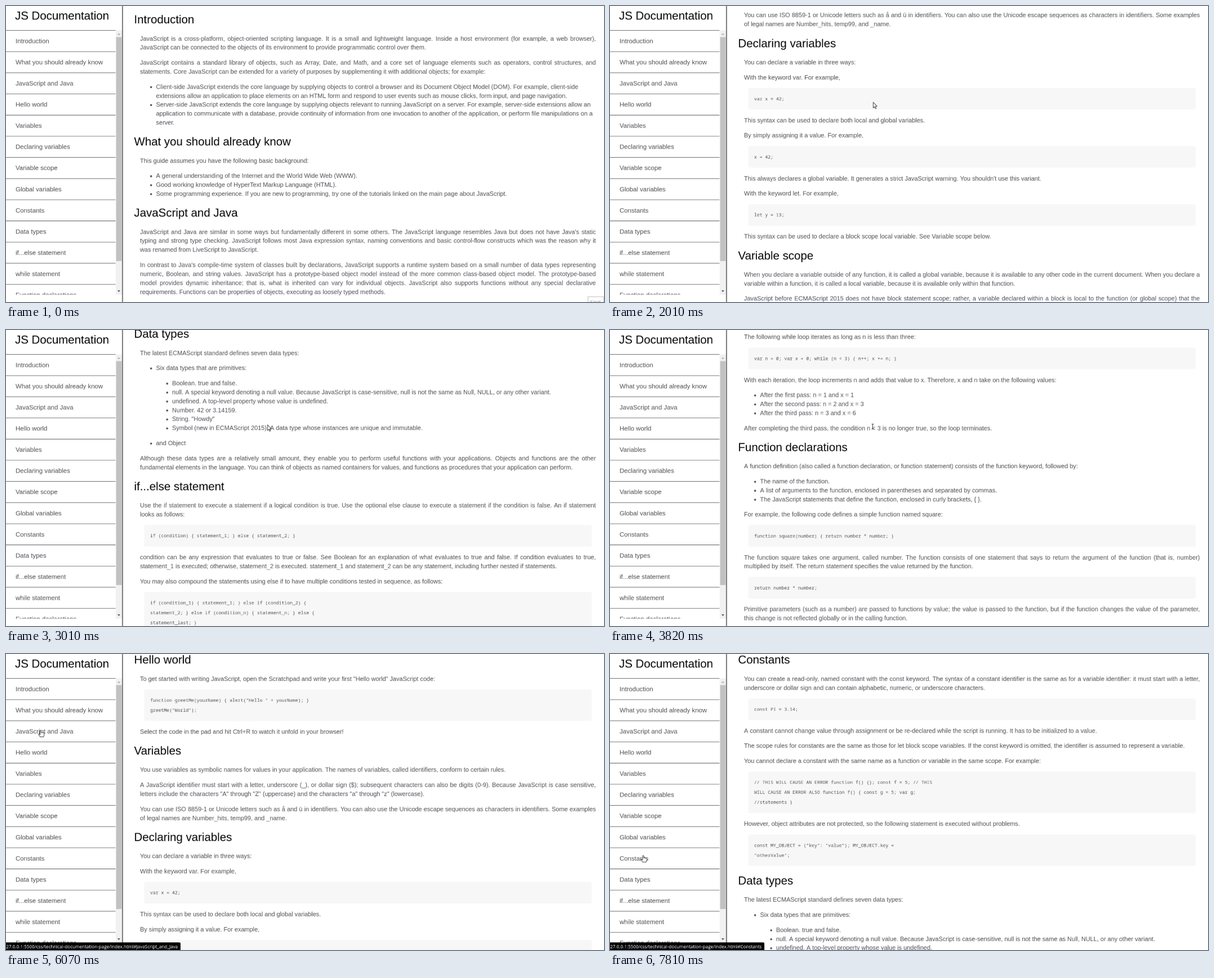
These frames come from a looping animation (1062 by 527 pixels, 8 s). An HTML page with a canvas:

```html
<!DOCTYPE html>
<html lang="en">
<head>
<meta charset="utf-8">
<title>JS Documentation</title>
<style>
  html, body { margin: 0; width: 100%; height: 100%; overflow: hidden; background: #fff; }
  canvas { display: block; width: 1062px; height: 527px; }
</style>
</head>
<body>
<canvas id="stage"></canvas>
<script>
const W = 1062, H = 527, LOOP = 8000;
const INK = '#4d4e53';
const SANS = '"Liberation Sans", Arial, sans-serif';
const BODY = `10.91px ${SANS}`;
const TITLE = `20.45px ${SANS}`;
const NAV = `11.4px ${SANS}`;
const CODE = '8.12px "Noto Sans Mono", monospace';
const URL_FONT = '8.1px "Open Sans", sans-serif';

// "$" code, "*" list item, "-" nested item, otherwise a paragraph; "|" is a line break.
const SECTIONS = [
  ['Introduction',
    'JavaScript is a cross-platform, object-oriented scripting language. It is a small and lightweight language. Inside a host environment (for example, a web browser),|JavaScript can be connected to the objects of its environment to provide programmatic control over them.',
    'JavaScript contains a standard library of objects, such as Array, Date, and Math, and a core set of language elements such as operators, control structures, and|statements. Core JavaScript can be extended for a variety of purposes by supplementing it with additional objects; for example:',
    '*Client-side JavaScript extends the core language by supplying objects to control a browser and its Document Object Model (DOM). For example, client-side|extensions allow an application to place elements on an HTML form and respond to user events such as mouse clicks, form input, and page navigation.',
    '*Server-side JavaScript extends the core language by supplying objects relevant to running JavaScript on a server. For example, server-side extensions allow an|application to communicate with a database, provide continuity of information from one invocation to another of the application, or perform file manipulations on a|server.'],
  ['What you should already know',
    'This guide assumes you have the following basic background:',
    '*A general understanding of the Internet and the World Wide Web (WWW).',
    '*Good working knowledge of HyperText Markup Language (HTML).',
    '*Some programming experience. If you are new to programming, try one of the tutorials linked on the main page about JavaScript.'],
  ['JavaScript and Java',
    "JavaScript and Java are similar in some ways but fundamentally different in some others. The JavaScript language resembles Java but does not have Java's static|typing and strong type checking. JavaScript follows most Java expression syntax, naming conventions and basic control-flow constructs which was the reason why it|was renamed from LiveScript to JavaScript.",
    "In contrast to Java's compile-time system of classes built by declarations, JavaScript supports a runtime system based on a small number of data types representing|numeric, Boolean, and string values. JavaScript has a prototype-based object model instead of the more common class-based object model. The prototype-based|model provides dynamic inheritance; that is, what is inherited can vary for individual objects. JavaScript also supports functions without any special declarative|requirements. Functions can be properties of objects, executing as loosely typed methods.",
    'JavaScript is a very free-form language compared to Java. You do not have to declare all variables, classes, and methods. You do not have to be concerned with|whether methods are public, private, or protected, and you do not have to implement interfaces. Variables, parameters, and function return types are not explicitly|typed.'],
  ['Hello world',
    'To get started with writing JavaScript, open the Scratchpad and write your first "Hello world" JavaScript code:',
    '$function greetMe(yourName) { alert("Hello " + yourName); }|greetMe("World");',
    'Select the code in the pad and hit Ctrl+R to watch it unfold in your browser!'],
  ['Variables',
    'You use variables as symbolic names for values in your application. The names of variables, called identifiers, conform to certain rules.',
    'A JavaScript identifier must start with a letter, underscore (_), or dollar sign ($); subsequent characters can also be digits (0-9). Because JavaScript is case sensitive,|letters include the characters "A" through "Z" (uppercase) and the characters "a" through "z" (lowercase).',
    'You can use ISO 8859-1 or Unicode letters such as å and ü in identifiers. You can also use the Unicode escape sequences as characters in identifiers. Some examples|of legal names are Number_hits, temp99, and _name.'],
  ['Declaring variables',
    'You can declare a variable in three ways:',
    'With the keyword var. For example,',
    '$var x = 42;',
    'This syntax can be used to declare both local and global variables.',
    'By simply assigning it a value. For example,',
    '$x = 42;',
    "This always declares a global variable. It generates a strict JavaScript warning. You shouldn't use this variant.",
    'With the keyword let. For example,',
    '$let y = 13;',
    'This syntax can be used to declare a block scope local variable. See Variable scope below.'],
  ['Variable scope',
    'When you declare a variable outside of any function, it is called a global variable, because it is available to any other code in the current document. When you declare a|variable within a function, it is called a local variable, because it is available only within that function.',
    'JavaScript before ECMAScript 2015 does not have block statement scope; rather, a variable declared within a block is local to the function (or global scope) that the|block resides within. For example the following code will log 5, because the scope of x is the function (or global context) within which x is declared, not the block,|which in this case is an if statement.',
    '$if (true) { var x = 5; } console.log(x); // 5',
    'This behavior changes, when using the let declaration introduced in ECMAScript 2015.',
    '$if (true) { let y = 5; } console.log(y); // ReferenceError: y is|not defined'],
  ['Global variables',
    'Global variables are in fact properties of the global object. In web pages the global object is window, so you can set and access global variables using the window.variable syntax.',
    'Consequently, you can access global variables declared in one window or frame from another window or frame by specifying the window or frame name. For example, if a variable called phoneNumber is declared in a document, you can refer to this variable from an iframe as parent.phoneNumber.'],
  ['Constants',
    'You can create a read-only, named constant with the const keyword. The syntax of a constant identifier is the same as for a variable identifier: it must start with a letter,|underscore or dollar sign and can contain alphabetic, numeric, or underscore characters.',
    '$const PI = 3.14;',
    'A constant cannot change value through assignment or be re-declared while the script is running. It has to be initialized to a value.',
    'The scope rules for constants are the same as those for let block scope variables. If the const keyword is omitted, the identifier is assumed to represent a variable.',
    'You cannot declare a constant with the same name as a function or variable in the same scope. For example:',
    '$// THIS WILL CAUSE AN ERROR function f() {}; const f = 5; // THIS|WILL CAUSE AN ERROR ALSO function f() { const g = 5; var g;|//statements }',
    'However, object attributes are not protected, so the following statement is executed without problems.',
    '$const MY_OBJECT = {"key": "value"}; MY_OBJECT.key =|"otherValue";'],
  ['Data types',
    'The latest ECMAScript standard defines seven data types:',
    '*Six data types that are primitives:',
    '-Boolean. true and false.',
    '-null. A special keyword denoting a null value. Because JavaScript is case-sensitive, null is not the same as Null, NULL, or any other variant.',
    '-undefined. A top-level property whose value is undefined.',
    '-Number. 42 or 3.14159.',
    '-String. "Howdy"',
    '-Symbol (new in ECMAScript 2015). A data type whose instances are unique and immutable.',
    '*and Object',
    'Although these data types are a relatively small amount, they enable you to perform useful functions with your applications. Objects and functions are the other|fundamental elements in the language. You can think of objects as named containers for values, and functions as procedures that your application can perform.'],
  ['if...else statement',
    'Use the if statement to execute a statement if a logical condition is true. Use the optional else clause to execute a statement if the condition is false. An if statement|looks as follows:',
    '$if (condition) { statement_1; } else { statement_2; }',
    'condition can be any expression that evaluates to true or false. See Boolean for an explanation of what evaluates to true and false. If condition evaluates to true,|statement_1 is executed; otherwise, statement_2 is executed. statement_1 and statement_2 can be any statement, including further nested if statements.',
    'You may also compound the statements using else if to have multiple conditions tested in sequence, as follows:',
    '$if (condition_1) { statement_1; } else if (condition_2) {|statement_2; } else if (condition_n) { statement_n; } else {|statement_last; }',
    "In the case of multiple conditions only the first logical condition which evaluates to true will be executed. To execute multiple statements, group them within a block statement ({ ... }). In general, it's good practice to always use block statements, especially when nesting if statements:",
    '$if (condition) { statement_1_runs_if_condition_is_true;|statement_2_runs_if_condition_is_true; } else {|statement_3_runs_if_condition_is_false;|statement_4_runs_if_condition_is_false; }'],
  ['while statement',
    'A while statement executes its statements as long as a specified condition evaluates to true. A while statement looks as follows:',
    '$while (condition) statement',
    'If the condition becomes false, statement within the loop stops executing and control passes to the statement following the loop.',
    'The condition test occurs before statement in the loop is executed. If the condition returns true, statement is executed and the condition is tested again. If the condition returns false, execution stops and control is passed to the statement following while.',
    'To execute multiple statements, use a block statement ({ ... }) to group those statements.',
    'Example:',
    'The following while loop iterates as long as n is less than three:',
    '$var n = 0; var x = 0; while (n < 3) { n++; x += n; }',
    'With each iteration, the loop increments n and adds that value to x. Therefore, x and n take on the following values:',
    '*After the first pass: n = 1 and x = 1',
    '*After the second pass: n = 2 and x = 3',
    '*After the third pass: n = 3 and x = 6',
    'After completing the third pass, the condition n < 3 is no longer true, so the loop terminates.'],
  ['Function declarations',
    'A function definition (also called a function declaration, or function statement) consists of the function keyword, followed by:',
    '*The name of the function.',
    '*A list of arguments to the function, enclosed in parentheses and separated by commas.',
    '*The JavaScript statements that define the function, enclosed in curly brackets, { }.',
    'For example, the following code defines a simple function named square:',
    '$function square(number) { return number * number; }',
    'The function square takes one argument, called number. The function consists of one statement that says to return the argument of the function (that is, number)|multiplied by itself. The return statement specifies the value returned by the function.',
    '$return number * number;',
    'Primitive parameters (such as a number) are passed to functions by value; the value is passed to the function, but if the function changes the value of the parameter,|this change is not reflected globally or in the calling function.'],
  ['Reference', '*All the documentation in this page is taken from public guides'],
];

const stage = document.getElementById('stage');
const view = stage.getContext('2d');
const dpr = window.devicePixelRatio || 1;
stage.width = W * dpr;
stage.height = H * dpr;

// The screen is drawn 1920 pixels wide and shown reduced.
const ZOOM = 1920 / W;
const screenBuffer = document.createElement('canvas');
screenBuffer.width = 1920;
screenBuffer.height = Math.round(H * ZOOM);
const ctx = screenBuffer.getContext('2d');
ctx.scale(ZOOM, ZOOM);

// Layout metrics
const LEFT = 238, MEASURE = 809.5, LINE = 15.95, GAP = 11;
const HEAD = 29.86, CODE_LINE = 17.7, CODE_PAD = 10.37;
const INDENT = { p: 0, '*': 28.5, '-': 57 };

function wrap(text) {
  const lines = [];
  let line = '';
  for (const word of text.split(' ')) {
    const next = line ? line + ' ' + word : word;
    if (line && ctx.measureText(next).width > MEASURE) {
      lines.push(line);
      line = word;
    } else line = next;
  }
  return [...lines, line];
}

function layout() {
  const items = [], heads = [];
  let edge = 24 - HEAD / 2 - GAP;
  ctx.font = BODY;
  for (const [title, ...blocks] of SECTIONS) {
    const center = edge + GAP + HEAD / 2;
    heads.push(center);
    items.push({ type: 'head', text: title, y: center });
    edge = center + HEAD / 2;
    let last = '';
    for (const block of blocks) {
      const kind = '$*-'.includes(block[0]) ? block[0] : 'p';
      const text = kind === 'p' ? block : block.slice(1);
      edge += kind === last && kind !== 'p' ? 0 : GAP;
      last = kind;
      if (kind === '$') {
        const lines = text.split('|');
        const h = lines.length * CODE_LINE + 2 * CODE_PAD;
        items.push({ type: 'code', lines, y: edge, h });
        edge += h;
        continue;
      }
      const lines = text.includes('|') ? text.split('|') : wrap(text);
      lines.forEach((line, i) => {
        const full = kind === 'p' && i < lines.length - 1;
        const spare = MEASURE - ctx.measureText(line).width;
        items.push({
          type: 'line', text: line, x: LEFT + INDENT[kind], y: edge + LINE / 2,
          space: full ? spare / (line.split(' ').length - 1) : 0,
          bullet: kind !== 'p' && i === 0,
        });
        edge += LINE;
      });
    }
  }
  return { items, heads };
}

const { items, heads } = layout();

// Screen updates come in steps; wheel scrolling is [time, section, heading y].
const TICKS = [0, 250, 500, 760, 1010, 1260, 1510, 1760, 2010, 2260, 2510, 2760, 3010, 3310, 3560, 3820, 4070];
const WHEEL = [[0, 0, 24], [1010, 0, 24], [1510, 2, 13.5], [2010, 5, 66.2], [3010, 9, 6.9], [3820, 12, 208.6], [4070, 13, 460]];
const CLICKS = [[5070, 6], [5320, 5], [5570, 4], [5820, 3], [6310, 2], [6810, 3], [7060, 4], [7310, 5], [7560, 6], [7810, 8]];
const ANCHOR_Y = 10.3;
const POINTER = [
  [500, 320, 140], [760, 400, 160], [1010, 440, 168], [1260, 451, 169], [1510, 451.5, 168.5],
  [2010, 467.5, 171.5], [3010, 464.5, 169], [3820, 466.5, 172, 'beam'], [4320, 440, 190],
  [4570, 330, 220], [4820, 150, 290], [5070, 70, 285], [5320, 50, 250], [5570, 42, 212],
  [5820, 38, 174], [6070, 61.5, 135.5], [6810, 58, 174], [7060, 57, 212], [7310, 57, 250],
  [7560, 57, 288], [7810, 59, 358.5],
];

const latest = (list, t) => list.filter(k => k[0] <= t).pop();

function scrollAt(t) {
  const click = latest(CLICKS, t);
  if (click) return heads[click[1]] - ANCHOR_Y;
  const tick = TICKS.filter(k => k <= t).pop();
  const i = WHEEL.findIndex(k => k[0] > tick);
  const at = ([, section, y]) => heads[section] - y;
  if (i < 0) return at(WHEEL[WHEEL.length - 1]);
  const a = WHEEL[i - 1], b = WHEEL[i];
  return at(a) + (at(b) - at(a)) * (tick - a[0]) / (b[0] - a[0]);
}

function label(text, x, y, font, color, drop) {
  ctx.font = font;
  ctx.fillStyle = color;
  ctx.fillText(text, x, y + drop);
}

function rect(x, y, w, h, color) {
  ctx.fillStyle = color;
  ctx.fillRect(x, y, w, h);
}

function drawPage(scroll) {
  for (const item of items) {
    const y = item.y - scroll;
    if (y < -120 || y > H + 20) continue;
    if (item.type === 'head') label(item.text, 227.5, y, TITLE, '#000', 7.1);
    else if (item.type === 'code') {
      ctx.fillStyle = '#f7f7f7';
      ctx.beginPath();
      ctx.roundRect(245.3, y, 795, item.h, 3.5);
      ctx.fill();
      item.lines.forEach((line, i) =>
        label(line, 256, y + CODE_PAD + (i + 0.5) * CODE_LINE, CODE, INK, 2.8));
    } else {
      ctx.wordSpacing = item.space + 'px';
      label(item.text, item.x, y, BODY, INK, 3.8);
      ctx.wordSpacing = '0px';
      if (item.bullet) {
        ctx.beginPath();
        ctx.arc(item.x - 8.8, y + 0.8, 1.7, 0, 7);
        ctx.fill();
      }
    }
  }
}

const NAV_TOP = 43.2, ROW = 37.67;

function triangle(x, y, dy, color) {
  ctx.fillStyle = color;
  ctx.beginPath();
  ctx.moveTo(x - 2.6, y);
  ctx.lineTo(x + 2.6, y);
  ctx.lineTo(x, y + dy);
  ctx.fill();
}

function drawNav() {
  label('JS Documentation', 16, 17, TITLE, '#000', 7.1);
  ctx.save();
  ctx.beginPath();
  ctx.rect(0, 40, 208, 474);
  ctx.clip();
  for (let i = 0; i < 13; i++) {
    const y = NAV_TOP + i * ROW;
    rect(0, y, 194.5, 0.8, INK);
    label(SECTIONS[i][0], 17, y + 19.2, NAV, INK, 3.9);
  }
  rect(194.7, 43.5, 11.6, 471, '#f1f1f1');
  rect(195.6, 55.5, 9.8, 398.5, '#c1c1c1');
  triangle(200.4, 51.5, -2.8, '#a3a3a3');
  triangle(200.4, 506.2, 2.8, '#505050');
  ctx.restore();
  rect(206.3, 0, 1.4, H, INK);
}

function drawStatus(section) {
  const url = '27.0.0.1:5500/css/technical-documentation-page/index.html#' +
    SECTIONS[section][0].replaceAll(' ', '_');
  ctx.font = URL_FONT;
  const w = ctx.measureText(url).width + 5;
  ctx.fillStyle = '#000';
  ctx.beginPath();
  ctx.roundRect(-4, 513.5, w + 4, 18, 2);
  ctx.fill();
  label(url, 0.3, 521, URL_FONT, '#fff', 2.9);
}

const ARROW = new Path2D('M0 0V9.8L2.2 7.8L3.8 11.3L5.2 10.6L3.7 7.3L6.7 7Z');
const HAND = new Path2D('M-1 1Q0-.5 1 1V4.5Q2 3.7 3 4.7Q4 4.1 4.8 5.2Q6 4.8 6.2 6V8.8L5 12H-.8L-3.8 7.6Q-3.4 6.2-2 7L-1 8Z');
const BEAM = new Path2D('M-2-4.5H-.5L0-4L.5-4.5H2M0-4V4M-2 4.5H-.5L0 4L.5 4.5H2');

function drawPointer(x, y, kind) {
  ctx.save();
  ctx.translate(x, y);
  ctx.strokeStyle = '#222';
  ctx.lineWidth = 0.8;
  const path = { arrow: ARROW, hand: HAND, beam: BEAM }[kind];
  if (kind !== 'beam') {
    ctx.fillStyle = '#fff';
    ctx.fill(path);
  }
  ctx.stroke(path);
  ctx.restore();
}

function drawButton() {
  rect(1033, 517, 29, 10, '#c4c4c4');
  rect(1034, 518, 27, 9, '#fdfdfd');
  label('Kayıt', 1037, 526.5, `8.3px ${SANS}`, '#a0a0a0', 3);
}

function drawScreen(t) {
  rect(0, 0, W, H + 1, '#fff');
  drawPage(scrollAt(t));
  drawNav();
  if (t < 250) drawButton();
  const pointer = latest(POINTER, t);
  if (!pointer) return;
  const [, x, y, kind] = pointer;
  const overNav = x < 194 && y > NAV_TOP;
  if (overNav) drawStatus(Math.floor((y - NAV_TOP) / ROW));
  drawPointer(x, y, kind || (overNav ? 'hand' : 'arrow'));
}

const start = performance.now();
function frame() {
  drawScreen((performance.now() - start) % LOOP);
  view.imageSmoothingQuality = 'high';
  view.drawImage(screenBuffer, 0, 0, W * ZOOM, H * ZOOM, 0, 0, stage.width, stage.height);
  requestAnimationFrame(frame);
}
frame();
</script>
</body>
</html>
```
